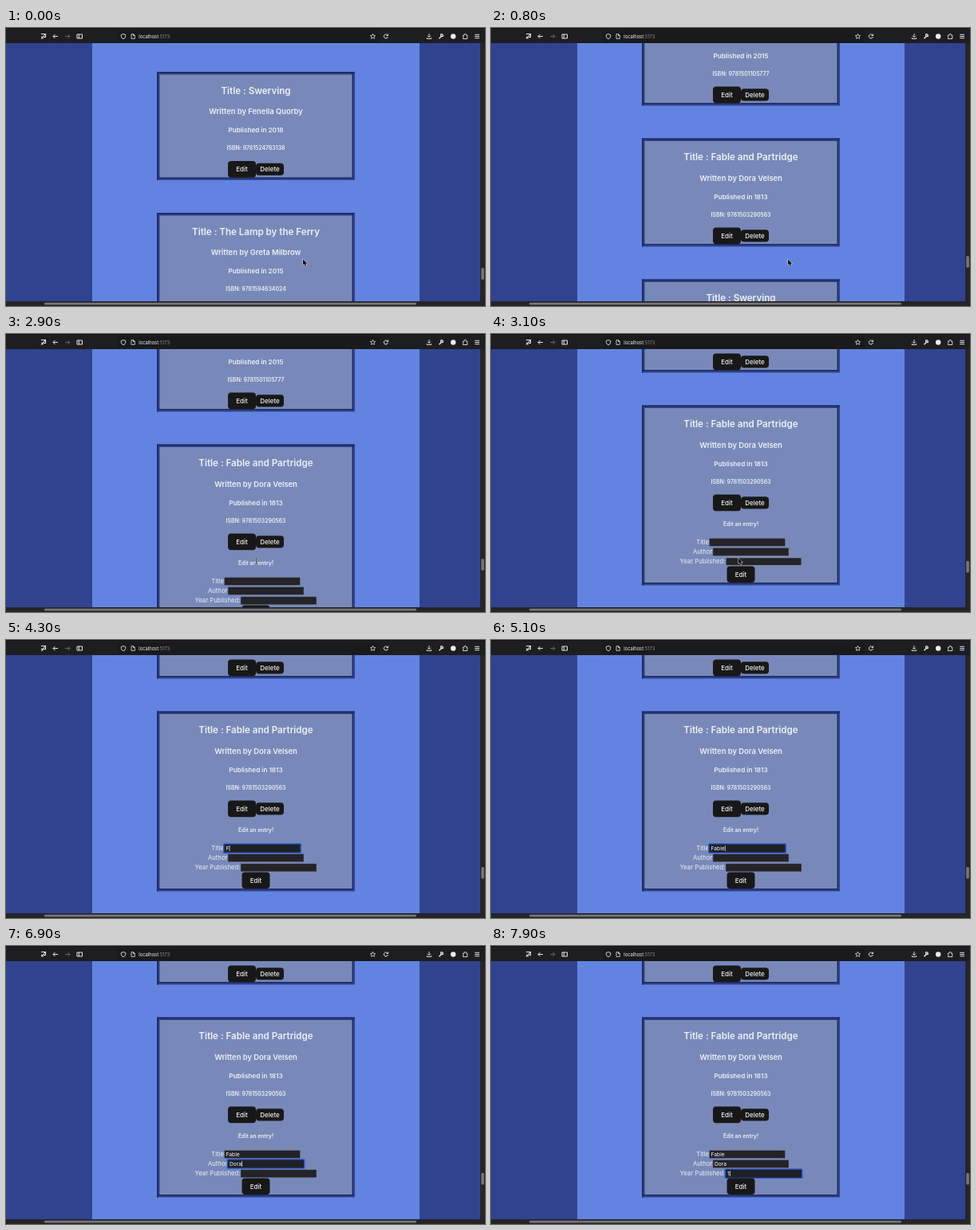
Recreate the animation shown at these times as an HTML page with a canvas. Size 600x349 px, loop 8 s.

```html
<!DOCTYPE html>
<html lang="en">
<head>
<meta charset="utf-8">
<title>Book list</title>
<style>
html, body { margin: 0; width: 100%; height: 100%; overflow: hidden; background: #31438f; }
canvas { display: block; width: 600px; height: 349px; }
</style>
</head>
<body>
<canvas id="stage"></canvas>
<script>
const W = 600, H = 349, LOOP = 8000;
const FONT = 'Inter, "Open Sans", sans-serif';
const INK = 'rgba(255,255,255,0.87)';
const CARD = { x: 189, w: 248, h: 136, gap: 41, formH: 226 };

const books = [
  { year: '2015', isbn: '9781501105777', title: '', author: '' },
  { title: 'Fable and Partridge', author: 'Dora Velsen', year: '1813', isbn: '9781503290563' },
  { title: 'Swerving', author: 'Fenella Quorby', year: '2018', isbn: '9781524763138' },
  { title: 'The Lamp by the Ferry', author: 'Greta Milbrow', year: '2015', isbn: '9781594634024' }
];

// Key presses per field: focus time, text, time of each character
const fields = [
  { label: 'Title', x: 273.5, y: 172, focus: 3900, text: 'Fable', keys: [4300, 4500, 4600, 4800, 4900] },
  { label: 'Author', x: 278, y: 184, focus: 5300, text: 'Dora', keys: [5400, 5500, 5700, 5800] },
  { label: 'Year Published:', x: 294, y: 196.2, focus: 7500, text: '1', keys: [7900] }
];

// Pointer path: time, x, y
const path = [
  [0, 372, 290.5], [1500, 372, 290.5], [2000, 297, 261], [2300, 297, 261],
  [2800, 313.5, 285], [2900, 313.5, 285], [3100, 310, 281], [3400, 310, 281], [3800, 306, 261]
];
const OPEN = 2200, HIDE = 4300;

const canvas = document.getElementById('stage');
const c = canvas.getContext('2d');
const dpr = window.devicePixelRatio || 1;
canvas.width = W * dpr;
canvas.height = H * dpr;

const ease = p => p * p * (3 - 2 * p);

function rect(x, y, w, h, color) {
  c.fillStyle = color;
  c.fillRect(x, y, w, h);
}

function round(x, y, w, h, r, color) {
  c.fillStyle = color;
  c.beginPath();
  c.roundRect(x, y, w, h, r);
  c.fill();
}

// y is the middle of the capital letters
function text(s, x, y, size, weight = 400, align = 'center', color = INK) {
  c.font = `${weight} ${size}px ${FONT}`;
  c.textAlign = align;
  c.fillStyle = color;
  c.fillText(s, x, y + size * 0.36);
}

function line(d, color = '#e6e6ea', width = 1) {
  c.strokeStyle = color;
  c.lineWidth = width;
  c.stroke(new Path2D(d));
}

function button(label, x, y, w, h) {
  round(x, y - h / 2, w, h, 4, '#181818');
  text(label, x + w / 2, y, 8, 500, 'center', '#f4f4f4');
}

function grooveFrame(x, y, w, h) {
  const light = '#31438f', dark = '#202d62';
  rect(x, y, w, h, light);
  c.fillStyle = dark;
  c.fillRect(x, y, w, 2);
  c.fillRect(x, y, 2, h);
  c.fillRect(x + 2, y + h - 4, w - 4, 2);
  c.fillRect(x + w - 4, y + 2, 2, h - 4);
  rect(x + 3.5, y + 3.5, w - 7, h - 7, '#7889b9');
}

function drawField(f, top, t, active, hover) {
  const y = top + f.y, n = f.keys.filter(k => t >= k).length;
  text(f.label, f.x - 0.5, y, 7.75, 400, 'right');
  if (active) round(f.x - 1.5, y - 6.2, 98, 12.4, 1.5, '#2458c8');
  rect(f.x, y - 5, 95, 10, active ? '#1c2038' : hover ? '#9a9aa2' : '#4a4a52');
  rect(f.x + 0.5, y - 4.5, 94, 9, active ? '#1f2027' : '#232328');
  const s = f.text.slice(0, n);
  text(s, f.x + 2, y + 0.2, 6.7, 400, 'left', '#fff');
  const since = t - (n ? f.keys[n - 1] : f.focus);
  if (active && since % 1000 < 500) {
    rect(f.x + 2.2 + c.measureText(s).width, y - 3.5, 0.7, 7, '#fff');
  }
}

function drawCard(book, top, open, t) {
  const mid = 313;
  grooveFrame(CARD.x, top, CARD.w, open ? CARD.formH : CARD.h);
  text('Title : ' + book.title, mid, top + 23.5, 11.6, 600);
  text('Written by ' + book.author, mid, top + 49.8, 9.4, 600);
  text('Published in ' + book.year, mid, top + 73.5, 8.15, 600);
  text('ISBN: ' + book.isbn, mid, top + 96, 6.9, 600);
  button('Edit', 278, top + 122.4, 35, 20.6);
  button('Delete', 313, top + 122.4, 35, 15.4);
  if (!open) return;
  text('Edit an entry!', mid, top + 149.2, 6.9, 600);
  const current = fields.filter(f => t >= f.focus).pop();
  const overYear = t >= 3100 && t < 3500;
  fields.forEach((f, i) => drawField(f, top, t, f === current, overYear && i === 2));
  button('Edit', 295.5, top + 212.2, 35, 20.6);
}

function drawPage(t) {
  const open = t >= OPEN;
  rect(0, 19, W, 325, '#31438f');
  rect(108, 19, 410, 325, '#6284e0');
  const scroll = t < 800 ? 260.5 : 49 * ease(Math.min(1, Math.max(0, (t - 2900) / 200)));
  let y = 138.5 - CARD.h - CARD.gap - scroll;
  books.forEach((book, i) => {
    const form = open && i === 1;
    if (y < 344) drawCard(book, y, form, t);
    y += (form ? CARD.formH : CARD.h) + CARD.gap;
  });
  const thumb = t < 800 ? 301 : open ? 282 + scroll * 0.055 : 286;
  rect(594, 19, 6, 325, '#252528');
  round(595.3, thumb, 3.6, 15, 1.8, '#77777b');
  rect(0, 343, W, 6, '#252528');
  round(48, 344.8, 466, 2.8, 1.4, '#77777b');
}

function drawToolbar() {
  const dim = '#66666c';
  rect(0, 0, W, 19, '#1e1e21');
  rect(0, 0, W, 1, '#111113');
  round(140, 3, 328, 15, 2, '#1a1a1d');
  line('M44.5 8V7.5H49.5V11.5H47M44 13.5L50 7M44.5 10.5L46.5 13.5', undefined, 1.1);
  line('M65 10.5H59M61.5 8L59 10.5L61.5 13');
  line('M74 10.5H80M77.500 8L80 10.5L77.500 13', dim);
  line('M89 8H95.500V13H89ZM91.300 8V13');
  line('M147 7.500L149.700 8.500V10.500Q149.500 12.800 147 13.800Q144.500 12.800 144.300 10.500V8.500Z', undefined, 0.9);
  line('M157 7.700H159.700L161.300 9.300V13.300H157ZM159.500 7.700V9.500H161.300', undefined, 0.8);
  text('localhost', 166.300, 10.800, 5.8, 400, 'left', '#f5f5f7');
  const end = 166.3 + c.measureText('localhost').width;
  text(':5173', end, 10.8, 5.8, 400, 'left', '#909096');
  let star = '';
  for (let i = 0; i < 10; i++) {
    const a = -Math.PI / 2 + i * Math.PI / 5, r = i % 2 ? 1.6 : 3.3;
    star += (i ? 'L' : 'M') + (459.5 + r * Math.cos(a)) + ' ' + (10.6 + r * Math.sin(a));
  }
  line(star + 'Z', undefined, 0.8);
  line('M478.300 11A2.500 2.500 0 1 1 477.600 8.700M478.600 7.500V9.500H476.600');
  line('M530 7V11.500M528 9.700L530 11.700L532 9.700M527.300 12V13.500H532.700V12', undefined, 0.9);
  line('M542.500 13.300L545.500 10.300M547.500 8L545.800 9.500', undefined, 1.5);
  line('M546.300 7.300A1.700 1.700 0 1 0 547.900 9.200', undefined, 1.2);
  round(557, 7.3, 6.4, 6.4, 3.2, '#ededf0');
  line('M572.500 9H574.300V8.300A1 1 0 0 1 576.300 8.300V9H577.800V13.500H572.500V11.900A1 1 0 0 0 572.500 10.200Z', undefined, 0.9);
  line('M587.300 8.300H593M587.300 10.500H593M587.300 12.700H593');
}

function pointerAt(t) {
  let i = path.length - 1;
  while (path[i][0] > t) i--;
  const a = path[i], b = path[i + 1] || a;
  const p = a === b ? 0 : ease((t - a[0]) / (b[0] - a[0]));
  return [a[1] + (b[1] - a[1]) * p, a[2] + (b[2] - a[2]) * p];
}

function drawPointer(t) {
  if (t >= HIDE) return;
  const [x, y] = pointerAt(t);
  const beam = (t >= 2700 && t < 3000) || t >= 3700;
  c.save();
  c.translate(x, y);
  if (beam) {
    const d = 'M-1.500 -4Q0 -4 0 -3V3Q0 4 -1.500 4M1.500 -4Q0 -4 0 -3M0 3Q0 4 1.500 4';
    line(d, '#d8dcc8', 1.6);
    line(d, '#23251f', 0.8);
  } else {
    const arrow = new Path2D('M0 0V7.300L1.700 5.800L2.900 8.500L4.200 7.900L3.100 5.300H5.300Z');
    c.fillStyle = '#111';
    c.strokeStyle = '#eee';
    c.lineWidth = 1;
    c.stroke(arrow);
    c.fill(arrow);
  }
  c.restore();
}

function frame(now) {
  const t = Math.floor(now % LOOP / 100) * 100;
  c.setTransform(dpr, 0, 0, dpr, 0, 0);
  drawPage(t);
  drawToolbar();
  drawPointer(t);
  requestAnimationFrame(frame);
}
requestAnimationFrame(frame);
</script>
</body>
</html>
```
